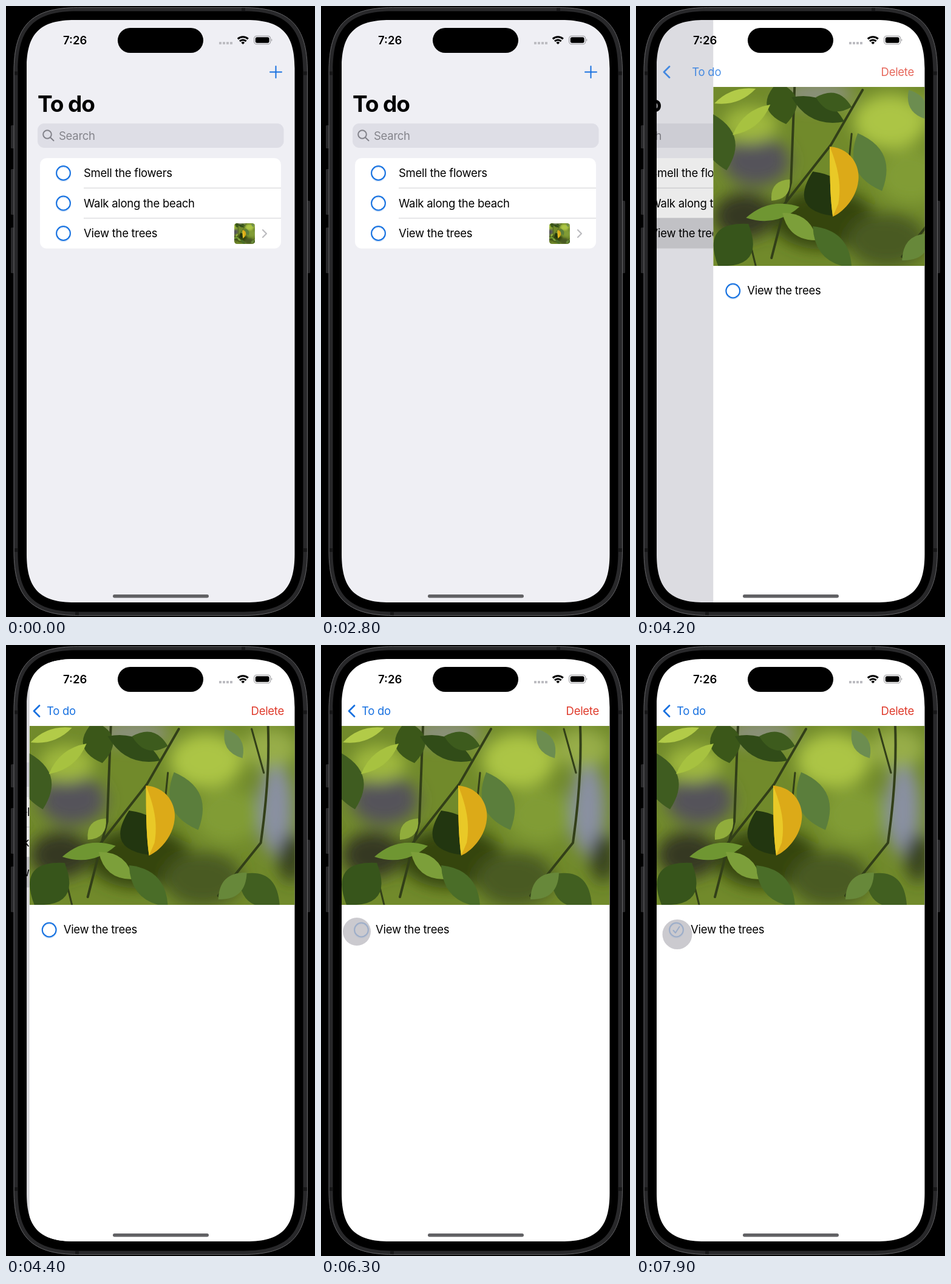
Animation, 509 px wide and 1004 px high, one loop 8000 ms. Source, as an HTML page:

```html
<!DOCTYPE html>
<html lang="en">
<head>
<meta charset="utf-8">
<title>To do</title>
<style>
  html, body { margin: 0; width: 100%; height: 100%; overflow: hidden; background: #000; }
  svg { display: block; width: 100%; height: 100%; }
  text { font: 400 18.5px Inter, "Open Sans", sans-serif; letter-spacing: -.27px; fill: #000; }
  .time { font-weight: 600; letter-spacing: 0; }
  .title { font-size: 37px; font-weight: 700; letter-spacing: -1.1px; }
  .hint { fill: #84848b; }
  .blue { fill: #1871e0; }
  .red { fill: #df3b2c; }
  .line { fill: none; stroke-linecap: round; stroke-linejoin: round; }
</style>
</head>
<body>
<svg viewBox="0 0 509 1004">
  <defs>
    <clipPath id="screen"><path id="glass"/></clipPath>
    <clipPath id="card"><rect x="56" y="250" width="397" height="148.5" rx="11"/></clipPath>
    <clipPath id="frame"><rect x="34" y="133" width="441.5" height="294"/></clipPath>
    <clipPath id="thumb"><rect x="376" y="357" width="34" height="34" rx="4.5"/></clipPath>
    <filter id="soft" x="-50%" y="-50%" width="200%" height="200%"><feGaussianBlur stdDeviation="13"/></filter>
    <g id="ring" class="line" stroke-width="2">
      <circle cy="1.6" r="11.5" stroke="#1871e0" opacity=".2"/>
      <circle r="11.4" stroke="#1470e0"/>
    </g>
    <g id="photo" clip-path="url(#frame)">
      <rect x="34" y="133" width="442" height="294" fill="#718a2b"/>
      <g id="blobs" filter="url(#soft)"></g>
      <g class="line" stroke="#323f18" stroke-width="4">
        <path d="M130 414L162 290L168 133M136 345L228 228L280 138M427 133C430 210 420 290 415 325L345 412"/>
        <path d="M400 138L420 210M90 370L104 427M262 210L258 250" stroke-width="3"/>
      </g>
      <g id="leaves"></g>
      <path d="M226 231C262 234 276 264 273 287C270 317 246 340 231 346C226 312 226 270 226 231Z" fill="#dcaa18"/>
      <path d="M226 231C238 262 246 290 240 325L231 346C226 312 226 270 226 231Z" fill="#e9c927"/>
    </g>
  </defs>

  <g fill="#29292b">
    <rect x="8" y="196" width="6" height="38" rx="1.5"/>
    <rect x="8" y="268" width="6" height="75" rx="1.5"/>
    <rect x="8" y="364" width="6" height="75" rx="1.5"/>
    <rect x="495" y="320" width="6" height="119" rx="1.5"/>
  </g>
  <path id="body" fill="#28282a" stroke="#656568"/>
  <path d="M391 3V8M117 996V1001M14 110.5H19M490 110.5H496M14 894H19M490 894H496" stroke="#171718" stroke-width="6"/>
  <path id="bezel"/>

  <g clip-path="url(#screen)">
    <g id="list">
      <rect x="34" y="23" width="442" height="957" fill="#efeff4"/>
      <text class="title" x="52" y="174">To do</text>
      <rect x="52" y="193" width="405.5" height="40" rx="11" fill="#dedee6"/>
      <g class="line" stroke="#82828a" stroke-width="2"><circle cx="68" cy="211" r="6.8"/><path d="M73 216L78.5 221.3"/></g>
      <text class="hint" x="87" y="220">Search</text>
      <g clip-path="url(#card)">
        <rect x="56" y="250" width="397" height="149" fill="#fff"/>
        <rect id="pressed" x="56" y="349" width="397" height="50" fill="#d1d1d6"/>
        <path d="M128 299.2H453M128 348.7H453" stroke="#d9d9dc" stroke-width="1.2"/>
      </g>
      <use href="#ring" x="94.5" y="274.5"/>
      <use href="#ring" x="94.5" y="324"/>
      <use href="#ring" x="94.5" y="373.5"/>
      <text x="128" y="281">Smell the flowers</text>
      <text x="128" y="330.5">Walk along the beach</text>
      <text x="128" y="380">View the trees</text>
      <g clip-path="url(#thumb)"><use href="#photo" transform="translate(393 374) scale(.1157) translate(-254.75 -280)"/></g>
      <path class="line" d="M423 368L429 374L423 380" stroke="#bcbcc0" stroke-width="2.2"/>
    </g>
    <rect id="dim" x="34" y="23" width="442" height="957"/>
    <g id="detail">
      <rect x="34" y="23" width="442" height="957" fill="#fff"/>
      <use href="#photo"/>
      <use href="#ring" x="66.5" y="468"/>
      <path id="check" class="line" d="M61.5 469L65 473L71.5 463" stroke="#1470e0" stroke-width="2"/>
      <text x="90" y="474">View the trees</text>
    </g>
    <path id="plus" class="line" d="M435 108.5H454M444.5 99V118" stroke="#1871e0" stroke-width="2"/>
    <g id="nav">
      <path class="line" d="M55 99.5L46 108.5L55 117.5" stroke="#1871e0" stroke-width="2.8"/>
      <text id="back" class="blue" x="67" y="115">To do</text>
      <text class="red" x="458" y="115" text-anchor="end">Delete</text>
    </g>

    <text class="time" x="94" y="63">7:26</text>
    <rect x="184" y="36" width="141" height="41" rx="20.5"/>
    <path d="M351 61H373" stroke="#bdbdc2" stroke-width="4" stroke-dasharray="4 2"/>
    <path d="M381.8 54.2A12.4 12.4 0 0 1 398.8 54.2M385 57.9A7.6 7.6 0 0 1 395.6 57.9" fill="none" stroke="#000" stroke-width="3"/>
    <path d="M390.3 63L387.4 60.2A4.2 4.2 0 0 1 393.2 60.2Z"/>
    <rect x="408.7" y="49.2" width="27" height="13.6" rx="4.4" fill="none" stroke="#98989c" stroke-width="1.1"/>
    <rect x="410.8" y="51.2" width="22.8" height="9.6" rx="2.7"/>
    <path d="M437.2 53.8Q439.6 56 437.2 58.2Z" fill="#98989c"/>
    <rect x="176" y="967" width="158" height="5.4" rx="2.7" fill="#616164"/>
  </g>
  <circle id="touch" fill="#bebdc4" fill-opacity=".8"/>
</svg>
<script>
const $ = id => document.getElementById(id);

function set(node, attrs) {
  for (const key in attrs) node.setAttribute(key, attrs[key]);
}

function add(parent, tag, attrs) {
  const node = document.createElementNS('http://www.w3.org/2000/svg', tag);
  set(node, attrs);
  $(parent).append(node);
}

// Rectangle with continuous corners that ease into the straight edges
function squircle(x, y, w, h, r) {
  const a = 1.28 * r, b = a - .355 * r;
  return `M${x + a} ${y}h${w - 2 * a}c${b} 0 ${a} ${a - b} ${a} ${a}v${h - 2 * a}c0 ${b} ${b - a} ${a} ${-a} ${a}` +
    `h${2 * a - w}c${-b} 0 ${-a} ${b - a} ${-a} ${-a}v${2 * a - h}c0 ${-b} ${a - b} ${-a} ${a} ${-a}z`;
}
set($('glass'), { d: squircle(34, 23, 441.5, 957, 62) });
set($('bezel'), { d: squircle(19.5, 8.5, 470, 987, 76.5) });
set($('body'), { d: squircle(13, 2.5, 483.5, 999, 82.5) });

// Blurred backdrop: x, y, rx, ry, colour
[
  [105, 255, 55, 40, '#55535a'], [85, 345, 50, 38, '#343820'], [205, 145, 60, 18, '#8d9184'],
  [440, 270, 28, 75, '#8990a2'], [325, 190, 60, 45, '#acc545'], [95, 195, 45, 30, '#9fb83e'],
  [215, 350, 85, 50, '#35440f'], [320, 385, 65, 45, '#4a5a22'], [360, 280, 55, 45, '#819c34'],
  [430, 170, 45, 32, '#97ad48'], [465, 350, 22, 40, '#39431f']
].forEach(([cx, cy, rx, ry, fill]) => add('blobs', 'ellipse', { cx, cy, rx, ry, fill }));

// Leaves: base, tip, width, colour
[
  [34, 178, 56, 270, 50, '#3f5c20'], [140, 125, 154, 194, 50, '#3b5719'], [163, 150, 250, 190, 34, '#314c18'],
  [203, 150, 262, 166, 30, '#3d5b1d'], [128, 162, 66, 212, 22, '#a7c240'], [104, 136, 36, 160, 18, '#b2cb48'],
  [272, 209, 312, 304, 50, '#5b7e3c'], [198, 272, 232, 345, 64, '#223610'], [92, 358, 42, 427, 66, '#37551b'],
  [88, 348, 176, 330, 26, '#6f9632'], [148, 340, 205, 385, 30, '#7c9f3a'], [198, 362, 262, 430, 40, '#4a6d28'],
  [378, 378, 446, 427, 50, '#415f20'], [345, 418, 392, 374, 32, '#67883a'], [356, 138, 385, 186, 26, '#6c8d50'],
  [160, 285, 130, 320, 24, '#91ad3c']
].forEach(([x, y, tx, ty, w, fill]) => {
  const len = Math.hypot(tx - x, ty - y), mx = (x + tx) / 2, my = (y + ty) / 2;
  const nx = (y - ty) / len * w, ny = (tx - x) / len * w;
  add('leaves', 'path', { fill, d: `M${x} ${y}Q${mx + nx} ${my + ny} ${tx} ${ty}Q${mx - nx} ${my - ny} ${x} ${y}` });
});

const LOOP = 8000, STEP = 100, PUSH = 4040, WIDTH = 441.5, OMEGA = .01826;
const clamp = v => Math.max(0, Math.min(1, v));

// Critically damped spring, settled after 600 ms
function push(t) {
  const s = t - PUSH;
  return s <= 0 ? 0 : s > 600 ? 1 : 1 - (1 + OMEGA * s) * Math.exp(-OMEGA * s);
}

function touchAt(t) {
  if (t >= 3800 && t < 4000) return [394, 382, 20];
  if (t >= 6200 && t < 6500) return [59 + Math.min(0, t - 6300) * .1, 471, 23];
  if (t >= 7800) return [68, 475.5, 24.5];
  return [0, 0, 0];
}

function draw(t) {
  const p = push(t), [cx, cy, r] = touchAt(t);
  set($('list'), { transform: `translate(${-.3 * WIDTH * p} 0)`, visibility: p < 1 ? 'visible' : 'hidden' });
  set($('dim'), { opacity: .1 * p });
  set($('detail'), { transform: `translate(${WIDTH * (1 - p)} 0)`, visibility: p > 0 ? 'visible' : 'hidden' });
  set($('pressed'), { opacity: t >= 4000 ? 1 : 0 });
  set($('plus'), { opacity: clamp(1 - 2 * p) });
  set($('nav'), { opacity: clamp(2 * p - .8) });
  set($('back'), { transform: `translate(${p > .98 ? 0 : 120 * (1 - p)} 0)` });
  set($('check'), { opacity: t >= 6500 ? 1 : 0 });
  set($('touch'), { cx, cy, r });
}

let shown = -1;
function tick() {
  const t = Math.floor(performance.now() % LOOP / STEP) * STEP;
  if (t !== shown) draw(shown = t);
  requestAnimationFrame(tick);
}
tick();
</script>
</body>
</html>
```
